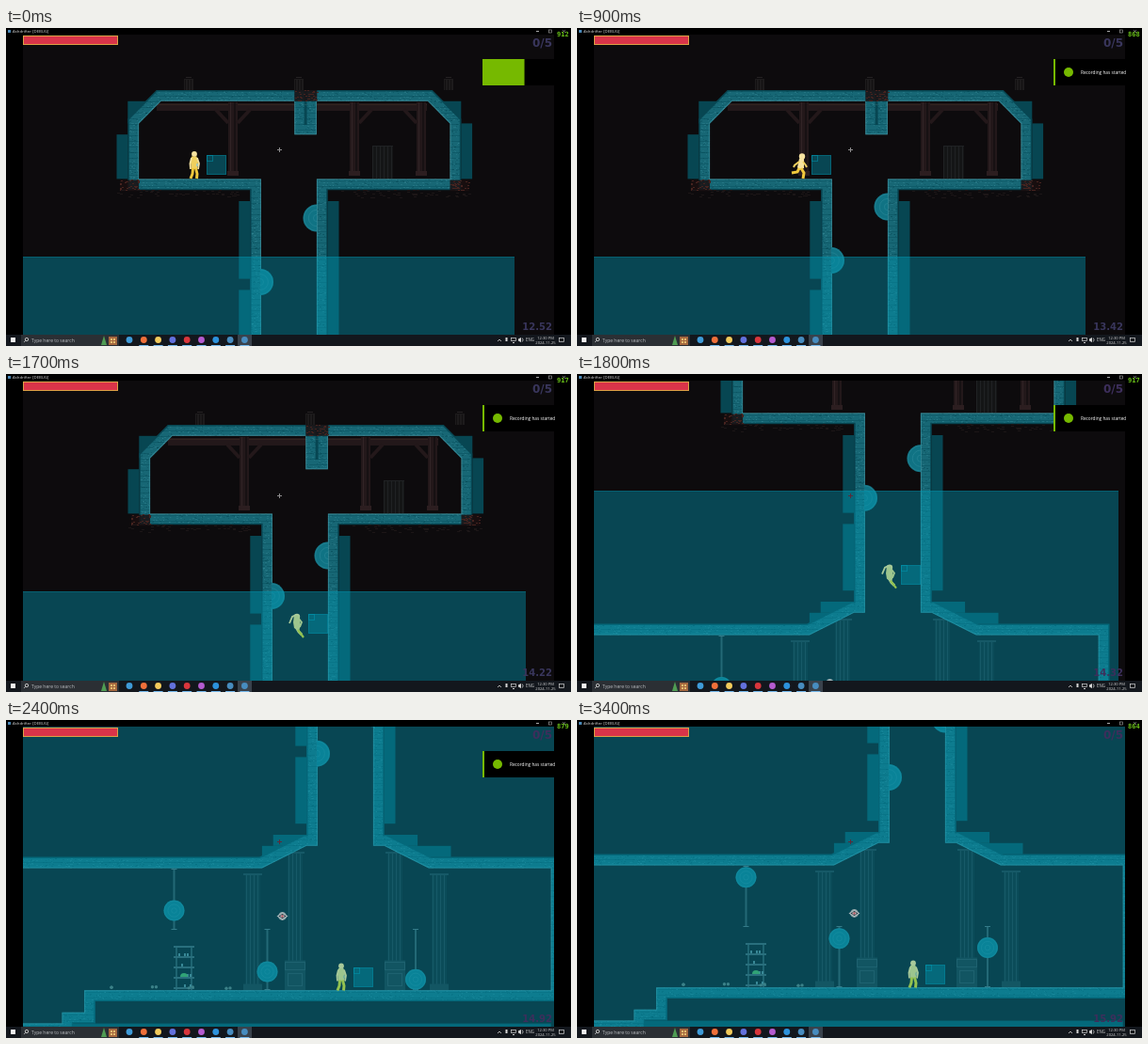
These frames come from a looping animation (600 by 338 pixels, 3500 ms). An HTML page with a canvas:

```html
<!DOCTYPE html>
<html lang="en">
<head>
<meta charset="utf-8">
<title>Ashdrifter [DEBUG]</title>
<style>
  html, body { margin: 0; width: 100%; height: 100%; overflow: hidden; background: #000; }
  canvas { display: block; width: 600px; height: 338px; }
</style>
</head>
<body>
<canvas id="stage" width="600" height="338"></canvas>
<script>
const stage = document.getElementById('stage').getContext('2d');
const LOOP = 3500, STEP = 100;
const TILE = 11.8, ORIGIN = 60, FLOOR = 526.5;
const DEBUG = 'rgba(0,153,179,.42)', EDGE = 'rgba(125,165,170,.55)';
const SANS = '"Open Sans", "Noto Sans", sans-serif';
const PI = Math.PI;

const col = i => 117.5 + TILE * i;
const row = j => 66 + TILE * j;
const clamp = v => Math.max(0, Math.min(1, v));

let seed = 7;
const rnd = () => (seed = (seed * 16807) % 2147483647) / 2147483647;

function rect(c, color, x, y, w, h) {
  c.fillStyle = color;
  c.fillRect(x, y, w, h);
}
function frameRect(c, color, x, y, w, h, width = 1) {
  c.strokeStyle = color;
  c.lineWidth = width;
  c.strokeRect(x, y, w, h);
}
function trace(c, p) {
  c.beginPath();
  for (let i = 0; i < p.length; i += 2) c.lineTo(p[i], p[i + 1]);
}
function poly(c, color, ...p) {
  trace(c, p);
  c.fillStyle = color;
  c.fill();
}
function line(c, color, width, ...p) {
  trace(c, p);
  c.strokeStyle = color;
  c.lineWidth = width;
  c.stroke();
}
function disc(c, color, x, y, r, from = 0, to = 2 * PI) {
  c.beginPath();
  c.arc(x, y, r, from, to);
  c.fillStyle = color;
  c.fill();
}
function ring(c, color, x, y, r, from = 0, to = 2 * PI) {
  c.beginPath();
  c.arc(x, y, r, from, to);
  c.strokeStyle = color;
  c.lineWidth = .8;
  c.stroke();
}
function label(text, x, y, font, color, align = 'left') {
  stage.font = font;
  stage.fillStyle = color;
  stage.textAlign = align;
  stage.fillText(text, x, y);
}
function layer(w, h) {
  const cv = document.createElement('canvas');
  cv.width = w;
  cv.height = h;
  return cv.getContext('2d');
}

// ---- static level, drawn once ----

// outline of the open space, in tiles: upper room, shaft, hall
const CAVITY = [
  4, 1, 16, 1, 16, 4, 18, 4, 18, 1, 28, 1, 30, 3, 30, 8, 18, 8, 18, 26, 19, 26, 23, 28, 34, 28,
  34, 39, -8, 39, -8, 41, -10, 41, -10, 42, -16, 42, -16, 28, 8, 28, 12, 26, 13, 26, 13, 8, 2, 8, 2, 3
].map((v, i) => i % 2 ? row(v) : col(v));

function cavityPath(open) {
  const path = new Path2D();
  for (let i = 0; i < CAVITY.length; i += 2) path.lineTo(CAVITY[i], CAVITY[i + 1]);
  path.closePath();
  if (!open) path.rect(-ORIGIN, 0, 680, 620);
  return path;
}

function stonePattern(c) {
  const s = layer(96, 96);
  rect(s, '#284349', 0, 0, 96, 96);
  for (let y = 0; y < 96; y += 6) rect(s, 'rgba(0,8,12,.35)', 0, y, 96, 1);
  for (let n = 0; n < 1100; n++) {
    const shade = rnd() < .5 ? 'rgba(120,155,160,.26)' : 'rgba(0,0,0,.3)';
    rect(s, shade, rnd() * 96 | 0, rnd() * 96 | 0, 1 + rnd() * 2 | 0, 1);
  }
  return c.createPattern(s.canvas, 'repeat');
}

function drawTimber(c) {
  const wood = '#23181a';
  rect(c, wood, 160, 80, 146, 8);
  rect(c, wood, 329, 80, 118, 8);
  rect(c, '#32231f', 160, 81, 287, 1);
  for (const x of [236, 365, 436]) {
    rect(c, wood, x, 79, 10, 77);
    rect(c, '#322426', x + 2, 79, 1, 76);
    rect(c, '#171113', x + 6, 79, 2, 76);
    rect(c, '#2c1e20', x - 1, 152, 12, 5);
    if (x !== 365) line(c, wood, 4, x, 101, x - 13, 87);
    if (x !== 436) line(c, wood, 4, x + 10, 101, x + 23, 87);
  }
  rect(c, '#141516', 389, 125, 22, 35);
  for (let x = 389; x < 412; x += 4) rect(c, '#202224', x, 125, 1, 35);
  rect(c, '#202224', 389, 125, 22, 1);
  for (const x of [194, 311, 470]) {
    rect(c, '#1d1b1c', x - 5, 54, 10, 12);
    rect(c, '#252223', x - 3, 52, 6, 1);
    for (let i = -4; i < 5; i += 3) rect(c, '#121011', x + i, 55, 1, 11);
  }
}

function drawColumn(c, x, top, tall) {
  rect(c, '#131518', x, top, 16, FLOOR - top);
  for (let i = 1; i < 16; i += 4) rect(c, '#282c31', x + i, top, 1, FLOOR - top);
  rect(c, '#262b30', x - 2, top, 20, 2);
  if (!tall) return rect(c, '#202529', x - 2, FLOOR - 7, 20, 7);
  rect(c, '#1f2428', x - 3, FLOOR - 32, 22, 32);
  frameRect(c, '#343a40', x - 2.5, FLOOR - 30, 21, 8);
  frameRect(c, '#343a40', x + .5, FLOOR - 18, 15, 13);
}

function drawHall(c) {
  for (const x of [194, 392]) drawColumn(c, x, 402, false);
  for (const x of [239, 345]) drawColumn(c, x, 379, true);
  for (const x of [120, 136]) rect(c, '#343d42', x, 479, 2, 47);
  for (let y = 479; y < FLOOR; y += 11) {
    rect(c, '#465156', 118, y, 22, 2);
    for (let x = 123; x < 136; x += 3)
      if (rnd() < .5) rect(c, '#607c80', x, y + 8, 2, 3);
  }
  disc(c, '#52a84a', 129, 512, 4, PI, 2 * PI);
  for (let i = 0; i < 4; i++) {
    const x = 52 + 40 * i + (i ? rnd() * 6 : 0);
    for (let k = 0; k < 2; k++) disc(c, '#656f69', x + 4 * k * Math.sign(i), FLOOR - 2 - 2 * rnd(), 1.7);
  }
}

function drawRust(c) {
  for (const [i, j] of [[16, 0], [.3, 8.1], [30, 8.1]]) {
    const w = j ? 20 : 24;
    rect(c, 'rgba(28,16,17,.85)', col(i), row(j), w, TILE);
    for (let n = 0; n < 30; n++)
      rect(c, '#46231f', col(i) + rnd() * w | 0, row(j) + rnd() * TILE | 0, 2, 1);
  }
  for (let n = 0; n < 150; n++) {
    const x = 118 + rnd() * 375;
    if (x < 247 || x > 353) rect(c, '#1c1617', x | 0, 172 + rnd() * 9 | 0, 3, 1);
  }
}

function collisionLayer() {
  const c = layer(680, 620);
  const block = (i, j, w, h) => c.fillRect(col(i), row(j), w * TILE, h * TILE);
  c.translate(ORIGIN, 0);
  c.clip(cavityPath(false), 'evenodd');
  c.fillStyle = c.strokeStyle = 'rgb(0,153,179)';
  c.lineWidth = 2 * TILE;
  c.stroke(cavityPath(true));
  // room corners and outer sides
  block(1, 1, 2, 2);
  block(29, 1, 2, 2);
  block(0, 4, 1, 4);
  block(31, 3, 1, 5);
  // shaft, with a notch on the left
  block(11, 10, 1, 7);
  block(11, 18, 1, 6);
  block(19, 10, 1, 14);
  // steps where the shaft widens
  for (let i = 0; i < 2; i++) {
    block(9 - i, 25 + i, 3, 1);
    block(19 + i, 25 + i, 3 + 2 * i, 1);
  }
  block(-16, 42, 50, 4);
  return c.canvas;
}

function buildLevel() {
  const c = layer(680, 620);
  c.translate(ORIGIN, 0);
  drawTimber(c);
  drawHall(c);
  c.save();
  c.clip(cavityPath(false), 'evenodd');
  c.strokeStyle = stonePattern(c);
  c.lineWidth = 2 * TILE - 3;
  c.stroke(cavityPath(true));
  c.strokeStyle = EDGE;
  c.lineWidth = 2;
  c.stroke(cavityPath(true));
  c.restore();
  c.globalAlpha = .42;
  c.drawImage(collisionLayer(), -ORIGIN, 0);
  c.globalAlpha = 1;
  drawRust(c);
  return c.canvas;
}
const level = buildLevel();

// ---- moving parts ----

// the camera settles exponentially once the fall begins
const settle = (t, from, goal) => t < from ? 0 : goal * (1 - Math.exp(-6.3 * (t - from)));

const wallSawY = (t, turn, top, rise, reach) => t < turn
  ? top + rise * Math.pow(1 - t / turn, 1.6)
  : top + reach * (1 - Math.cos(1.48 * (t - turn)));

function saw(c, x, y, r, from, to) {
  disc(c, '#1d5863', x, y, r, from, to);
  for (const k of [.93, .6, .25]) ring(c, '#3d737c', x, y, r * k, from, to);
  disc(c, DEBUG, x, y, r, from, to);
}
function rail(c, x, top, y) {
  rect(c, '#3c464a', x - 1, top, 2, 64);
  for (const end of [0, 64]) rect(c, '#59666a', x - 3, top + end, 6, 1);
  saw(c, x, y, 11);
}
function drawEye(c, x, y) {
  disc(c, '#8ea3a8', x, y, 4.4);
  poly(c, '#a9b8bb', x - 6, y, x, y - 4, x + 6, y, x, y + 4);
  poly(c, '#18303a', x - 4, y, x, y - 2.5, x + 4, y, x, y + 2.5);
  rect(c, '#e3d6d8', x - 2, y - 1, 4, 2);
  rect(c, '#b8525c', x - 1, y - 1, 2, 2);
}

function heroAt(t) {
  const fall = Math.max(0, t - 1.18);
  const drop = t < 1.7 ? 488 * fall * fall : 132 + 547 * (t - 1.7);
  const feet = Math.min(FLOOR, 160 + drop);
  const pose = feet > 160 && feet < FLOOR ? 'fall' : t > .6 && !fall ? 'run' : 'idle';
  return { x: 200 + 120 * Math.max(0, Math.min(.8, t - .6)), feet, pose };
}
function drawHero(c, { x, feet, pose }, t) {
  const wet = feet > 245;
  const skin = wet ? '#a8c99a' : '#f6e3a0';
  const cloth = wet ? '#9dc58e' : '#efd05e';
  const leg = wet ? '#93c250' : '#f0c83c';
  c.save();
  c.translate(x, feet);
  if (pose === 'idle') {
    disc(c, skin, 0, -26, 2.9);
    poly(c, cloth, -3, -23.5, 2.5, -23.5, 4, -18, 3, -10, -3, -10, -4, -17);
    line(c, skin, 1.8, -3, -22, -4.5, -16, -4, -10);
    line(c, skin, 1.8, 3, -22, 5, -16, 4, -10);
    line(c, leg, 3, -1.5, -11, -2, -5, -4, 0);
    line(c, leg, 3, 1.5, -11, 3, -5, 2.5, 0);
    rect(c, wet ? '#78b39c' : '#a9c9b4', 2, -16, 2, 3);
  } else if (pose === 'run') {
    const s = Math.cos((t - .9) * 16);
    disc(c, skin, 3, -23.5, 3.2);
    poly(c, skin, 0, -21, 5, -21, 5, -11, 0, -9, -2, -12);
    line(c, cloth, 2, 0, -18, -5 * s, -14, -6 * s, -12);
    line(c, cloth, 2, 4, -18, 4 + 3 * s, -14, 5 + 3 * s, -12);
    line(c, leg, 3, 0, -11, -2 * s, -7, -8 * s, -6);
    line(c, leg, 3, 2, -11, 2 + 3 * s, -6, 1 + 3 * s, 0);
  } else {
    disc(c, skin, 1, -22, 3.2);
    poly(c, cloth, -2, -24, 3, -23, 5, -13, 3, -7, -2, -10, -3, -16);
    line(c, skin, 1.8, 0, -24, -4, -22, -7, -15);
    line(c, cloth, 1.8, 3, -20, 6, -16, 4, -11);
    line(c, cloth, 3, 0, -11, 3, -6, 6, -3);
    line(c, leg, 2.2, 2, -8, 5, -4, 8, 0);
  }
  c.restore();
}
function debugBox(c, x, y) {
  rect(c, DEBUG, x, y, 21, 21);
  frameRect(c, 'rgba(0,153,179,.35)', x + .5, y + .5, 20, 20);
  frameRect(c, 'rgba(0,153,179,.5)', x + .5, y + .5, 6, 6);
}

function drawWorld(c, t) {
  const camX = Math.round(settle(t, 1.665, 61)), camY = Math.round(settle(t, 1.692, -242));
  const hero = heroAt(t);
  c.save();
  c.beginPath();
  c.rect(18, 7, 564, 319);
  c.clip();
  rect(c, '#0d0b0d', 18, 7, 564, 319);
  c.translate(camX, camY);
  c.drawImage(level, -ORIGIN, 0);
  saw(c, 330, wallSawY(t, .95, 190, 12, 27), 14.5, PI / 2, 1.5 * PI);
  saw(c, 270, wallSawY(t, 1.3, 243, 27, 30), 14, -PI / 2, PI / 2);
  const sway = 24 * Math.sin(1.5 * (t - 2.8));
  rail(c, 118.5, 397, 428 - sway);
  rail(c, 217.5, 461, 493 - sway);
  rail(c, 375, 461, 494 + 22 * Math.cos(1.7 * (t - 2.2)));
  rect(c, DEBUG, -ORIGIN, 243, 600, 400);
  rect(c, 'rgba(0,153,179,.3)', -ORIGIN, 243, 600, 1);
  drawEye(c, 233.5, 447.5);
  drawHero(c, hero, t);
  debugBox(c, Math.round(hero.x) + 13, Math.round(hero.feet) - 25);
  c.restore();
  drawHud(c, t, camY < -100);
}

function drawHud(c, t, sunk) {
  const cross = sunk ? '#5c2b3a' : '#8d8c8d', ink = sunk ? '#3d2f5c' : '#39365c';
  rect(c, cross, 288, 129, 5, 1);
  rect(c, cross, 290, 127, 1, 5);
  rect(c, '#d93449', 18, 8, 101, 10);
  frameRect(c, '#dda045', 18.5, 8.5, 100, 9);
  const bold = size => `bold ${size}px "DejaVu Sans", sans-serif`;
  label('0/5', 580, 19.5, bold(12), ink, 'right');
  label((12.52 + t).toFixed(2), 580, 321, bold(10), ink, 'right');
}

function drawNotice(c, t) {
  const left = 506, top = 33, w = 81, h = 28, green = '#76b900';
  const cover = t < 1 ? clamp(.55 - 2 * t) : clamp((t - 2.5) / .2);
  const exit = clamp((t - 2.8) / .2);
  if (exit === 1) return;
  if (!exit) rect(c, '#000', left, top, w, h);
  if (t > 0 && cover < 1) {
    disc(c, green, 522, 47, 5);
    label('Recording has started', 535, 49, '4.75px ' + SANS, '#fff');
  }
  rect(c, green, left + w * exit, top, Math.max(2, w * cover) - w * exit, h);
}

function drawTitleBar(c, t) {
  rect(c, '#4a88b8', 2, 2, 3, 3);
  label('Ashdrifter [DEBUG]', 7, 5.2, '4.3px ' + SANS, '#d8d8d8');
  rect(c, '#aaa', 563, 3, 3, 1);
  frameRect(c, '#aaa', 576.5, 2, 3, 3, .6);
  line(c, '#aaa', .6, 591, 2, 594, 5);
  line(c, '#aaa', .6, 594, 2, 591, 5);
  const fps = [912, 868, 917, 879, 864][Math.floor((t + .35) / .8)] || 864;
  label(fps, 585, 8.5, 'bold 7px "DejaVu Sans Mono", monospace', '#68bf18');
}

function drawTaskbar(c) {
  rect(c, '#13171d', 0, 326, 600, 12);
  rect(c, '#f0f0f0', 5, 329, 5, 5);
  rect(c, '#2b2f34', 16, 326, 104, 12);
  ring(c, '#ddd', 22, 331, 1.7);
  line(c, '#ddd', .7, 20.8, 332.2, 19, 334);
  label('Type here to search', 27, 334, '5px ' + SANS, '#b9bcc0');
  poly(c, '#4f9c53', 101, 337, 104, 327, 107, 337);
  rect(c, '#a5683f', 109, 328, 9, 9);
  for (let i = 0; i < 4; i++) rect(c, '#e5bd70', 111 + 3 * (i % 2), 330 + 3 * (i >> 1), 2, 2);

  rect(c, '#39424c', 246, 326, 15, 12);
  const icons = ['#3f9bd8', '#f0703a', '#f3cb5c', '#6371dd', '#d9363c', '#b55bd0', '#2c92dc', '#478cbf', '#478cbf'];
  icons.forEach((color, i) => {
    const x = 131 + i * 15.3;
    disc(c, color, x, 331.5, 3.4);
    if (i) rect(c, '#76b9ed', x - 5, 337, 10, 1);
  });

  const tray = '#d4d4d4';
  line(c, tray, .8, 522, 333, 524, 331, 526, 333);
  rect(c, tray, 530.5, 329, 2, 4);
  frameRect(c, tray, 536.5, 329.5, 5, 3, .7);
  rect(c, tray, 538, 334, 2, 1);
  poly(c, tray, 544, 330.5, 547, 329, 547, 334, 544, 332.5);
  ring(c, tray, 546, 331.5, 3, -.7, .7);
  label('ENG', 552, 333.4, '4.4px ' + SANS, tray);
  label('12:30 PM', 573, 330.8, '4.1px ' + SANS, tray, 'center');
  label('2024-11-25', 573, 336.4, '4.1px ' + SANS, tray, 'center');
  frameRect(c, tray, 587.5, 329.5, 5, 4, .7);
}

const start = performance.now();
function frame() {
  const elapsed = (performance.now() - start) % LOOP;
  const t = Math.floor(elapsed / STEP) * STEP / 1000;
  rect(stage, '#000', 0, 0, 600, 338);
  drawWorld(stage, t);
  drawNotice(stage, t);
  drawTitleBar(stage, t);
  drawTaskbar(stage);
  requestAnimationFrame(frame);
}
frame();
</script>
</body>
</html>
```
